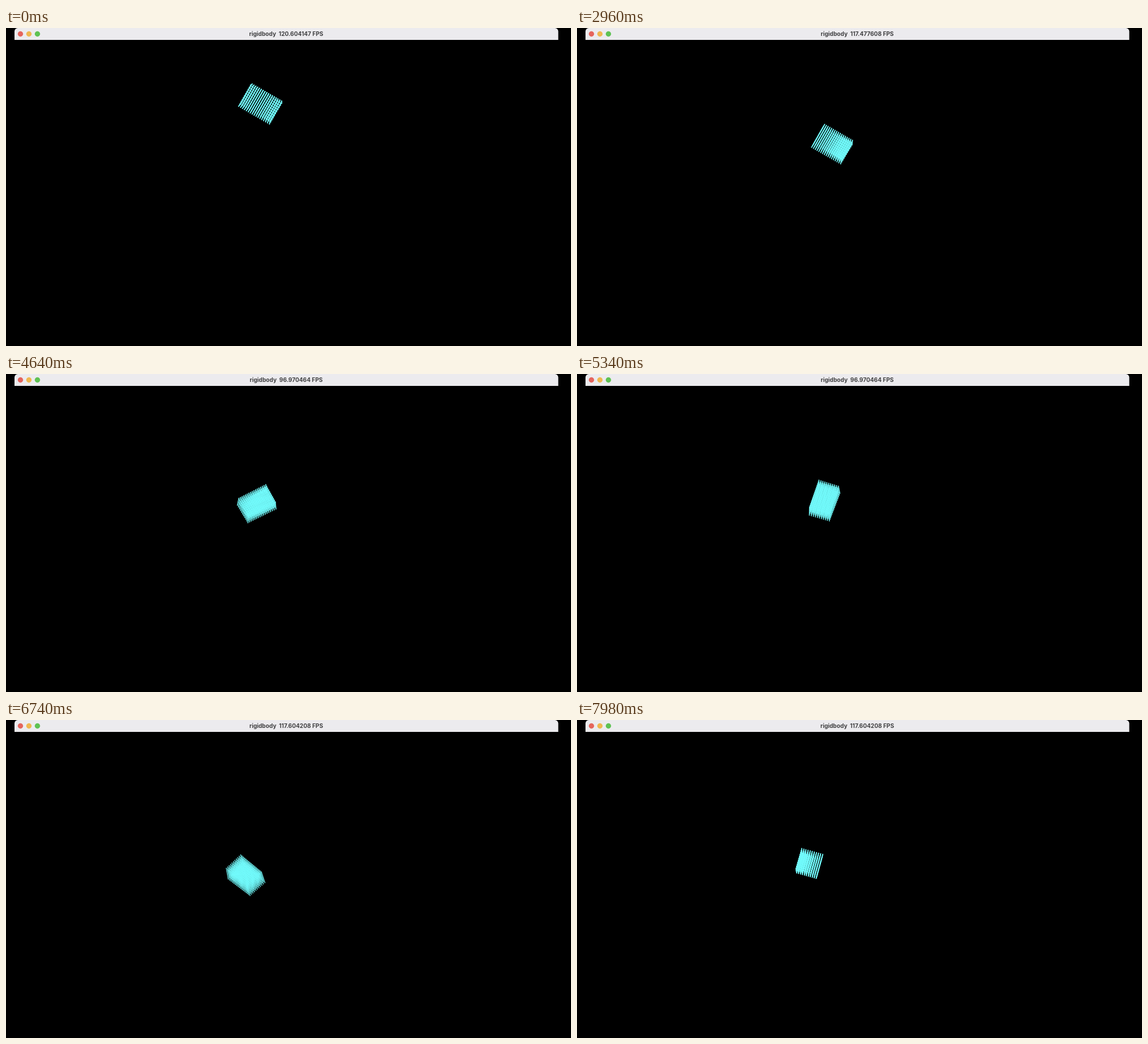
An HTML page with a canvas for the animation above (8 s loop, 998 by 561 pixels).

```html
<!DOCTYPE html>
<html lang="en">
<head>
<meta charset="utf-8">
<title>rigidbody</title>
<style>
html, body { margin: 0; width: 100%; height: 100%; overflow: hidden; background: #000; }
canvas { display: block; }
</style>
</head>
<body>
<canvas id="stage" width="998" height="561"></canvas>
<script>
const ctx = document.getElementById('stage').getContext('2d');
const LOOP = 8000;
const SPACING = [3.83, 4.12, 3.9];   // px between particles along each box axis
const HALF = [8, 5, 5];              // particles on each side of the center
const PERSPECTIVE = 0.0017;
const TERMINAL = 108;                // px/s

// Free fall and two bounces: speeds in px, degrees and scale per second
const rest = { x: 449.8, y: 133.2, scale: 1, spin: 3, tilt: 8, roll: 27 };
const flights = [
  { start: 1675, end: 3700, gravity: 86, x: 1.2, y: 0, scale: -0.045, spin: 6, tilt: 5, roll: -6 },
  { start: 3700, end: 6545, gravity: 62.8, x: -9.6, y: -88.7, scale: -0.01, spin: -50, tilt: 3, roll: -12 },
  { start: 6545, end: LOOP, gravity: 62.8, x: -10.5, y: -66.8, scale: 0.015, spin: 25, tilt: 38, roll: 25 }
];

// Pictures are shown for 100, 20 and 20 ms but lie evenly in simulated time
function simTime(t) {
  const cycle = Math.floor((t - 20) / 140);
  const phase = t - 20 - cycle * 140;
  const step = phase < 100 ? 0 : phase < 120 ? 1 : 2;
  return 20 + cycle * 140 + step * 140 / 3;
}

function bodyAt(t) {
  const body = { ...rest };
  for (const flight of flights) {
    const u = (Math.min(t, flight.end) - flight.start) / 1000;
    if (u <= 0) break;
    for (const key in body) body[key] += flight[key] * u;
    // gravity acts until the terminal speed is reached
    const pull = Math.min(u, (TERMINAL - flight.y) / flight.gravity);
    body.y += flight.gravity * pull * (u - pull / 2);
  }
  return body;
}

function rotate(p, q, degrees) {
  const c = Math.cos(degrees * Math.PI / 180), s = Math.sin(degrees * Math.PI / 180);
  return [p * c - q * s, p * s + q * c];
}

function drawParticle(body, i, j, k) {
  let [x, y, z] = [i, j, k].map((n, axis) => n * SPACING[axis] * body.scale);
  [x, y] = rotate(x, y, body.spin);
  [z, y] = rotate(z, y, body.tilt);
  [x, y] = rotate(x, y, body.roll);
  const zoom = 1 / (1 - z * PERSPECTIVE);
  ctx.fillRect(body.x + x * zoom - 0.8, body.y + y * zoom - 0.8, 1.6, 1.6);
}

function drawBox(t) {
  const body = bodyAt(t);
  const [a, b, c] = HALF;
  ctx.fillStyle = '#72fafb';
  for (let i = -a; i <= a; i++)
    for (let j = -b; j <= b; j++)
      for (let k = -c; k <= c; k++) drawParticle(body, i, j, k);
}

function fpsLabel(t) {
  if (t < 580) return '120.604147';
  if (t < 3480) return '117.477608';
  return t < 6380 ? '96.970464' : '117.604208';
}

function drawBar(t) {
  ctx.fillStyle = '#ecebee';
  ctx.beginPath();
  ctx.roundRect(15, 0, 960.5, 21, [6, 6, 0, 0]);
  ctx.fill();
  ['#e5655d', '#f0b850', '#5fc253'].forEach((color, i) => {
    ctx.fillStyle = color;
    ctx.beginPath();
    ctx.arc(25.5 + 15 * i, 10.5, 4.7, 0, 2 * Math.PI);
    ctx.fill();
  });
  ctx.fillStyle = '#404042';
  ctx.font = 'bold 10.1px Inter, Roboto, sans-serif';
  ctx.textAlign = 'center';
  ctx.fillText(`rigidbody\u00a0 ${fpsLabel(t)} FPS`, 495, 13.6);
}

function frame() {
  const t = performance.now() % LOOP;
  ctx.fillStyle = '#000';
  ctx.fillRect(0, 0, 998, 561);
  drawBar(t);
  drawBox(simTime(t));
  requestAnimationFrame(frame);
}
frame();
</script>
</body>
</html>
```
